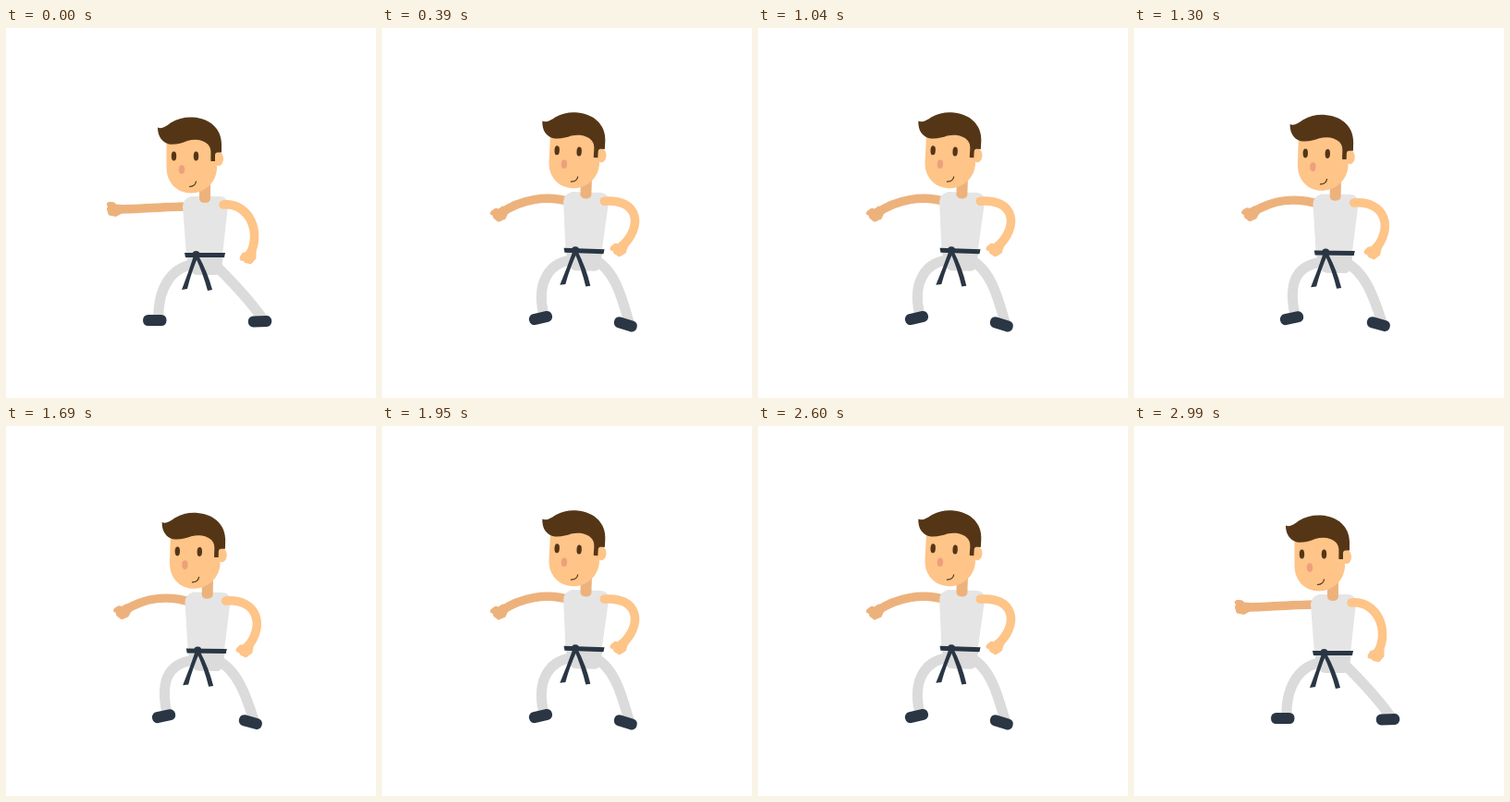
Animation of 400 by 400 pixels, one loop 3.12 s. Source, as an HTML page:

```html
<!DOCTYPE html>
<html lang="en">
<head>
<meta charset="utf-8">
<title>Karate punch</title>
<style>
  html, body { margin: 0; width: 100%; height: 100%; overflow: hidden; background: #fff; }
  svg { display: block; width: 100vw; height: 100vh; }
  .arm, .leg { fill: none; stroke-width: 9.5; }
  .leg { stroke-width: 11; stroke: #dbdbdb; }
  .cloth { fill: #dbdbdb; }
  .skin { fill: #fec488; }
  .shade { fill: #edb27c; }
  .dark { fill: #2a3644; }
  .hair { fill: #543617; }
</style>
</head>
<body>
<svg viewBox="0 0 400 400">
  <defs>
    <path id="fist" d="M7-5L1-5.500Q0-8-3-8H-7Q-11-6-8-3-10 0-8 3-8 7-4 7L1 8 8 4Z"/>
    <rect id="shoe" x="-12.700" y="-6" width="25.400" height="12" rx="5.500"/>
  </defs>

  <path id="armL" class="arm" stroke="#edb27c"/>
  <use id="handL" href="#fist" class="shade"/>
  <path id="legL" class="leg"/>
  <path id="legR" class="leg"/>
  <use id="shoeL" href="#shoe" class="dark"/>
  <use id="shoeR" href="#shoe" class="dark"/>

  <!-- origin at the middle of the belt -->
  <g id="body">
    <path class="cloth" d="M-20 0H20L18 14Q17 22 12 22H-8Q-14 22-17 14Z"/>
    <path fill="#e5e5e5" d="M-24-52Q-24-60-15-63H16Q24-63 25-54L19 1H-20Z"/>
    <path class="shade" d="M-6-76H6V-61Q6-56 0-56T-6-61Z"/>
    <g class="dark">
      <path d="M-22-2H22L21 3H-21Z"/>
      <circle cx="-9.500" cy="0" r="4"/>
      <path d="M-12 1H-7Q-15 20-19 37L-25 38Q-18 20-12 1Z"/>
      <path d="M-11 1H-7Q3 19 8 38L3 39Q-2 20-11 1Z"/>
    </g>
    <g id="head">
      <g transform="translate(-215 -244.500)">
        <ellipse class="skin" cx="230" cy="141" rx="5" ry="7.500"/>
        <path class="skin" d="M173.500 119V150C173.500 167 185 178 200 178S228 166 228 150V119Z"/>
        <path class="hair" d="M164 107C168 109 173 106 178 102 186 97 194 95.500 202 96 221 97 233 109 233 125V134H229Q226 134 226 137V143.500H221.500C221 136 223 130 218 125 213 120 204 119 196 121.500 190 124 183 126 176 125 169 123 164 117 164 107Z"/>
        <ellipse class="hair" cx="181.500" cy="138" rx="2.700" ry="5"/>
        <ellipse class="hair" cx="205.500" cy="138" rx="2.700" ry="5"/>
        <ellipse cx="190" cy="152.500" rx="3.200" ry="4.800" fill="#eda07c"/>
        <path d="M198 171Q205 171 205.500 165" fill="none" stroke="#543617" stroke-width="1.200"/>
      </g>
    </g>
  </g>

  <path id="armR" class="arm" stroke="#fec488" stroke-linecap="round"/>
  <use id="handR" href="#fist" class="skin"/>
</svg>
<script>
  const STEP = 130;   // ms per drawing
  const STEPS = 12;   // one swing out and back

  // x, y, angle in the punch, guard and crouch; snap is the ease-out power.
  const parts = {
    body:  { snap: 1.7, keys: [[215, 245, 0], [218.5, 240.5, 1.8], [213, 253, -2.2]] },
    handL: { snap: 6,   keys: [[118, 196, 0], [128, 200.5, -36], [124.5, 188.5, 50]] },
    handR: { snap: 2.5, keys: [[263, 246, -60], [257.5, 238, -42], [272, 256, -85]] },
    shoeL: { snap: 6,   keys: [[160.8, 316, 0], [171.5, 313.5, -13], [167.3, 317.7, -32]] },
    shoeR: { snap: 6,   keys: [[274.5, 317.3, -2], [263.3, 320.3, 17], [258.5, 327, 31]] }
  };

  // Each limb leaves the body at "from" degrees, changed by the tip's angle
  // times "follow", and enters its tip turned by "turn".
  const limbs = {
    armL: { tip: "handL", root: [-17, -52], grip: [0, 0],  from: 0,   follow: -.5,  turn: 0,    slack: 102 },
    armR: { tip: "handR", root: [20, -54],  grip: [0, 0],  from: 175, follow: 0,    turn: 0,    slack: 90 },
    legL: { tip: "shoeL", root: [-5, 10],   grip: [4, -3], from: 0,   follow: 0,    turn: -90,  slack: 105 },
    legR: { tip: "shoeR", root: [9, 9],     grip: [3, -3], from: 222, follow: -1.3, turn: -123, slack: 105 }
  };

  const get = id => document.getElementById(id);
  const rad = deg => deg * Math.PI / 180;
  const mix = (a, b, k) => a.map((v, i) => v + (b[i] - v) * k);

  function poseAt({ snap, keys: [punch, guard, crouch] }, n) {
    return n > 3 ? mix(guard, crouch, (n - 3) / 2)
                 : mix(punch, guard, 1 - (1 - n / 3) ** snap);
  }

  // Stage position of a point fixed to a posed part.
  function pin([x, y, deg], [px, py]) {
    const c = Math.cos(rad(deg)), s = Math.sin(rad(deg));
    return [x + px * c - py * s, y + px * s + py * c];
  }

  // A limb bends more the closer its ends come together.
  function limbPath(limb, body, tip) {
    const start = pin(body, limb.root), end = pin(tip, limb.grip);
    const reach = limb.slack - Math.hypot(end[0] - start[0], end[1] - start[1]);
    const out = pin([...start, limb.from + limb.follow * tip[2]], [-reach, 0]);
    const into = pin([...end, tip[2] + limb.turn], [reach, 0]);
    return `M${start}C${out} ${into} ${end}`;
  }

  function render(n) {
    const pose = {};
    for (const id in parts) {
      const [x, y, deg] = pose[id] = poseAt(parts[id], n);
      get(id).setAttribute("transform", `translate(${x} ${y}) rotate(${deg})`);
    }
    get("head").setAttribute("transform", `rotate(${pose.body[2] * .7} 0 -70)`);
    for (const id in limbs) {
      get(id).setAttribute("d", limbPath(limbs[id], pose.body, pose[limbs[id].tip]));
    }
  }

  let shown = -1;
  function tick() {
    const i = Math.floor(performance.now() / STEP) % STEPS;
    const n = Math.min(i, STEPS - 1 - i);
    if (n !== shown) render(shown = n);
    requestAnimationFrame(tick);
  }
  tick();
</script>
</body>
</html>
```
